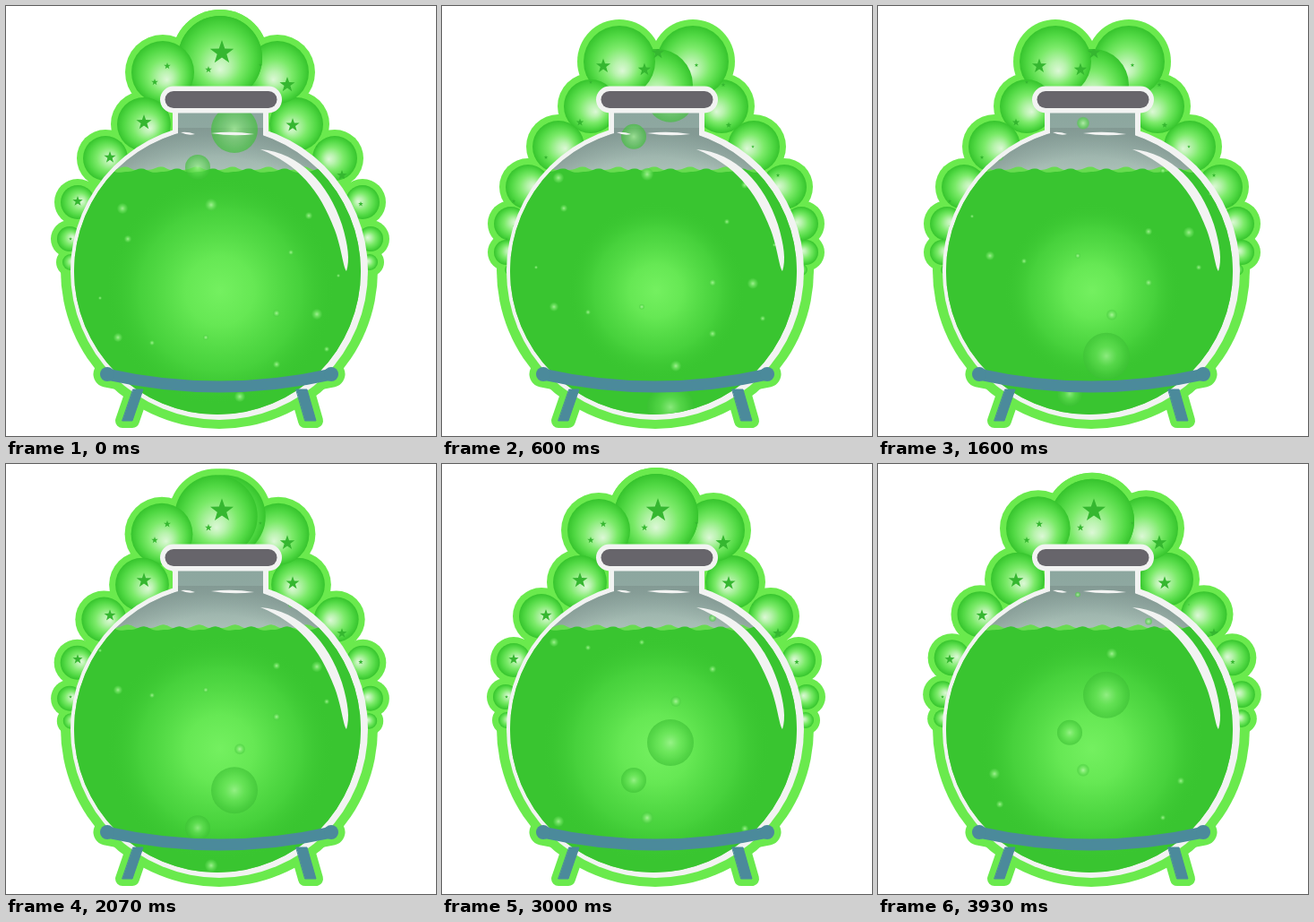
An HTML page with a canvas for the animation above (3.99 s loop, 480x480 px).

```html
<!DOCTYPE html>
<html lang="en">
<head>
<meta charset="utf-8">
<title>Bubbling potion</title>
<style>
html, body { margin: 0; width: 100%; height: 100%; overflow: hidden; background: #fff; }
canvas { display: block; width: 480px; height: 480px; }
</style>
</head>
<body>
<canvas id="stage" width="480" height="480"></canvas>
<script>
const ctx = document.getElementById('stage').getContext('2d');
const LOOP = 3990, FPS = 15, TAU = Math.PI * 2;
const RIM = '#6aea4d', WHITE = '#f2f3f2', STEEL = '#4b8a9b';

// Foam path on the left side: age in seconds, x, y, radius
const PATH = [
  [-1, 239, 130, 36], [-.47, 240, 95, 40], [-.4, 240, 88, 40], [-.07, 239, 64, 47],
  [0, 239, 58, 47], [.53, 203, 61, 41], [.6, 198, 62, 40], [1, 175, 74, 35],
  [1.6, 166, 112, 30], [2, 154, 132, 30], [2.53, 138, 153, 29], [2.6, 130, 157, 29],
  [3, 111, 170, 25], [3.6, 96, 202, 25], [4, 80, 219, 19], [4.6, 77, 243, 19],
  [5, 71, 260, 14], [5.6, 72, 275, 14], [6, 72, 286, 9], [7, 80, 300, 5]
];
// x, y, radius at the start and at the middle of each second
const STARS = [
  [241, 52, 14, 7], [180, 67, 4, 9], [166, 85, 4, 2], [226, 71, 4, 8], [284, 66, 2, 2.5],
  [314, 88, 9, 2], [154, 130, 9, 4], [320, 133, 8, 3], [116, 169, 7, 2], [347, 157, 1, 2],
  [375, 189, 6, 2], [80, 218, 6, 2], [396, 221, 3, 1], [72, 260, 2, 1], [81, 246, 1, 2]
];
// x, starting y, radius
const FIZZ = [
  [255, 138, 26], [214, 180, 14], [229, 222, 7], [130, 226, 6], [136, 260, 4],
  [338, 234, 4], [318, 275, 3], [105, 326, 2], [125, 370, 5], [163, 376, 3],
  [223, 370, 3], [302, 343, 4], [347, 344, 6], [302, 400, 4], [358, 383, 3],
  [261, 436, 6], [371, 301, 2]
];
const RISE = 57, SPAN = 344;

const mix = (a, b, k) => a + (b - a) * k;

function circle(x, y, r, fill) {
  ctx.beginPath();
  ctx.arc(x, y, r, 0, TAU);
  if (fill) { ctx.fillStyle = fill; ctx.fill(); }
}

function line(path, width, color) {
  ctx.lineWidth = width;
  ctx.strokeStyle = color;
  ctx.lineCap = ctx.lineJoin = 'round';
  ctx.stroke(path);
}

function radial(x, y, r, stops, fx = x, fy = y) {
  const g = ctx.createRadialGradient(fx, fy, 0, x, y, r);
  stops.forEach(([at, color]) => g.addColorStop(at, color));
  return g;
}

function foamAt(age) {
  let i = 1;
  while (i < PATH.length - 1 && PATH[i][0] < age) i++;
  const a = PATH[i - 1], b = PATH[i], k = (age - a[0]) / (b[0] - a[0]);
  return { x: mix(a[1], b[1], k), y: mix(a[2], b[2], k), r: mix(a[3], b[3], k) };
}

function foamList(phase) {
  const left = [];
  for (let n = -1; n < 7; n++) left.push(foamAt(n + phase));
  const right = left.map(b => ({ ...b, x: 478 - b.x })).reverse();
  return right.concat(left);
}

function drawFoamBubble({ x, y, r }) {
  const dx = 239 - x, dy = 190 - y, d = Math.hypot(dx, dy) || 1;
  const fx = x + dx / d * r * .28, fy = y + dy / d * r * .28;
  circle(x, y, r, radial(x, y, r, [
    [0, '#dcf8d6'], [.22, '#b9f3ae'], [.52, '#7bea69'], [.8, '#50d843'], [1, '#36c42d']
  ], fx, fy));
}

function star(x, y, r) {
  ctx.beginPath();
  for (let i = 0; i < 10; i++) {
    const a = i * TAU / 10 - TAU / 4, d = i % 2 ? r * .4 : r;
    ctx.lineTo(x + d * Math.cos(a), y + d * Math.sin(a));
  }
  ctx.closePath();
  ctx.fill();
}

function drawStars(foam, beat) {
  ctx.save();
  ctx.beginPath();
  foam.forEach(b => {
    ctx.moveTo(b.x + b.r, b.y);
    ctx.arc(b.x, b.y, b.r, 0, TAU);
  });
  ctx.clip();
  ctx.fillStyle = '#35b730';
  STARS.forEach(([x, y, r0, r1]) => star(x, y, mix(r1, r0, beat)));
  ctx.restore();
}

const bar = new Path2D('M112 411 Q238 439 364 411');
const legs = new Path2D('M142 428 L153 428 L141 463 L130 463 Z M324 428 L336 428 L346 463 L334 463 Z');
const cap = new Path2D('M187 104.5 L293 104.5');
const glass = new Path2D('M192 108 H287 V150 H192 Z');
const body = new Path2D();
body.arc(236, 296, 160, 0, TAU);
const inside = new Path2D(glass);
inside.addPath(body);

function surface(t, base, shift) {
  ctx.beginPath();
  ctx.moveTo(60, 480);
  for (let x = 60; x <= 420; x += 2) {
    const a = (x / 40 - t + shift) * TAU;
    ctx.lineTo(x, base + 2 * Math.sin(a) + .7 * Math.sin(2 * a + 1));
  }
  ctx.lineTo(420, 480);
  ctx.closePath();
}

function drawFizz(x, y, r) {
  const big = r > 8;
  circle(x, y, r, radial(x, y, r, big ? [
    [0, 'rgba(165,245,150,.75)'], [.45, 'rgba(105,225,90,.55)'],
    [.8, 'rgba(72,203,62,.6)'], [1, 'rgba(62,192,54,.65)']
  ] : [
    [0, 'rgba(185,250,170,.8)'], [.45, 'rgba(125,232,110,.7)'],
    [.8, 'rgba(85,213,74,.65)'], [1, 'rgba(75,203,65,.4)']
  ]));
}

function drawContents(t, beat) {
  ctx.save();
  ctx.clip(inside);

  const air = ctx.createLinearGradient(0, 112, 0, 186);
  air.addColorStop(0, '#8ba69e');
  air.addColorStop(.42, '#8fa8a1');
  air.addColorStop(1, '#abc1b8');
  ctx.fillStyle = air;
  ctx.fillRect(60, 90, 360, 110);
  ctx.fillStyle = radial(236, 296, 160, [
    [0, 'rgba(120,140,135,0)'], [.8, 'rgba(120,140,135,0)'], [1, 'rgba(120,140,135,.5)']
  ]);
  ctx.fillRect(60, 136, 360, 60);

  surface(t, 182, .45);
  ctx.fillStyle = '#68dc50';
  ctx.fill();
  surface(t, 184, 0);
  ctx.fillStyle = '#39c530';
  ctx.fill();
  const reach = mix(96, 128, beat);
  ctx.fillStyle = radial(239, 318, reach, [
    [0, '#74f060'], [.3, '#66e854'], [.7, 'rgba(76,214,64,.75)'], [1, 'rgba(57,197,48,0)']
  ]);
  ctx.fillRect(80, 190, 320, 270);

  FIZZ.forEach(([x, y0, r]) => {
    const y = y0 - RISE * t;
    drawFizz(x, y, r);
    drawFizz(x, y + SPAN, r);
  });
  ctx.restore();
}

function drawHighlights() {
  ctx.fillStyle = WHITE;
  ctx.fill(new Path2D(
    'M284 160 C328 164 360 198 375 244 C382 267 384 284 380 296 ' +
    'C376 290 375 272 367 250 C350 205 326 177 284 160 Z'));
  ctx.fill(new Path2D(
    'M195 141 Q203 140 211 143 Q203 145 195 141 Z M229 142 Q253 139 277 143 Q253 146 229 142 Z'));
}

function draw(t) {
  const phase = t % 1;
  const beat = (1 + Math.cos(phase * TAU)) / 2;
  const foam = foamList(phase);
  ctx.fillStyle = '#fff';
  ctx.fillRect(0, 0, 480, 480);

  // Bright green rim around everything
  foam.forEach(b => circle(b.x, b.y, b.r + 7, RIM));
  circle(238, 295, 177, RIM);
  line(bar, 29, RIM);
  line(legs, 16, RIM);
  ctx.fillStyle = RIM;
  ctx.fill(legs);

  foam.forEach(drawFoamBubble);
  drawStars(foam, beat);

  // Flask
  circle(238, 296, 166, WHITE);
  ctx.fillRect(186, 108, 107, 42);
  drawContents(t, beat);
  drawHighlights();
  line(cap, 30, WHITE);
  line(cap, 19, '#67656b');

  // Stand
  line(bar, 13, STEEL);
  circle(113, 411, 8, STEEL);
  circle(363, 411, 8, STEEL);
  ctx.fillStyle = STEEL;
  ctx.fill(legs);
  line(legs, 1, STEEL);
}

const start = performance.now();
function tick() {
  const ms = (performance.now() - start) % LOOP;
  const step = Math.floor((ms + 5) * FPS / 1000);
  draw(step / FPS);
  requestAnimationFrame(tick);
}
tick();
</script>
</body>
</html>
```
